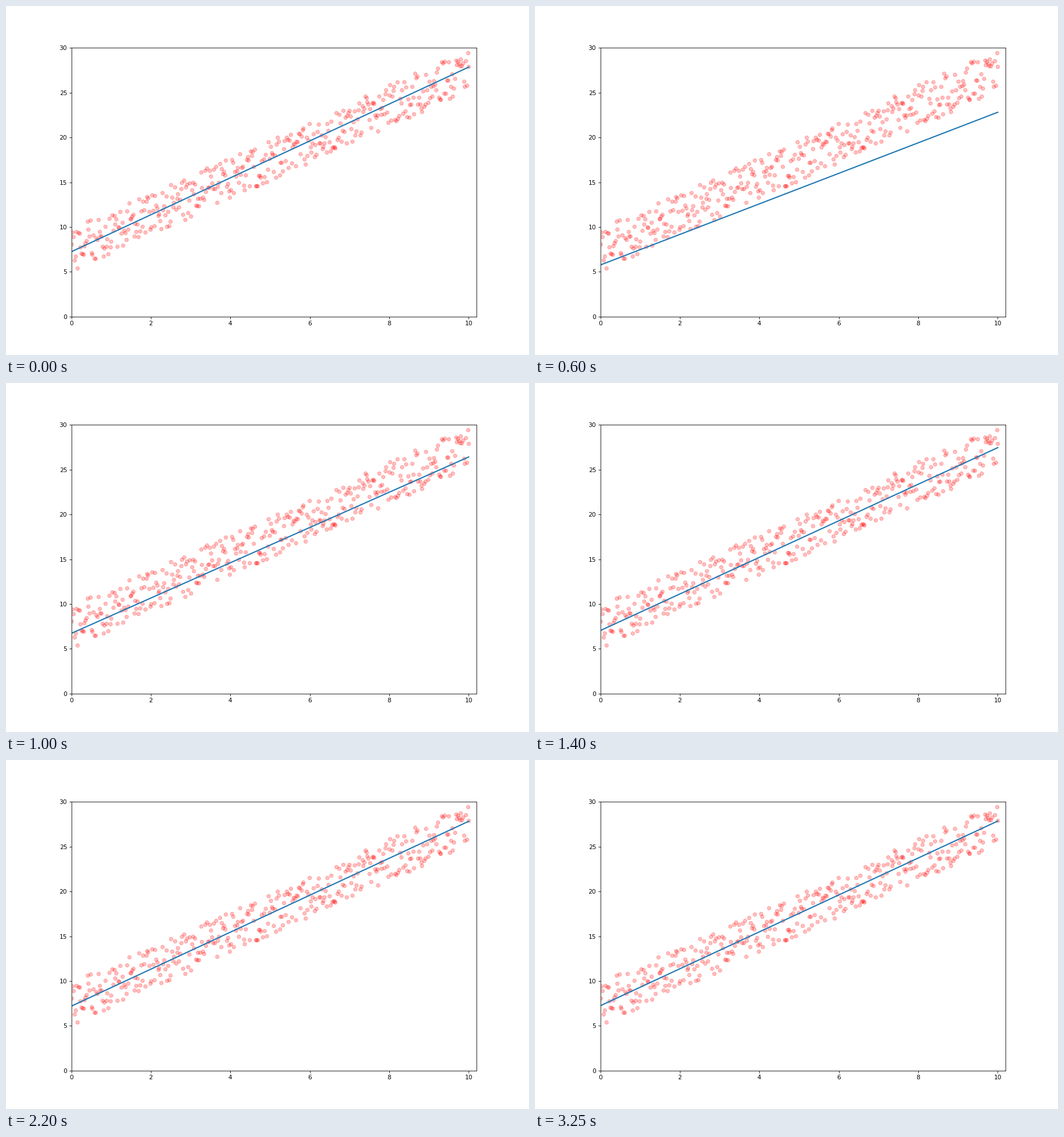
Animation of 917x611 px, one loop 3300 ms. Source, as a matplotlib script:

```python
import numpy as np
import matplotlib.pyplot as plt
from matplotlib.animation import FuncAnimation

WIDTH, HEIGHT = 917, 611
DPI = WIDTH / 12
FRAMES, INTERVAL = 66, 50
POINTS = 400


def make_cloud():
    """Points scattered evenly in a band around y = 2x + 7.5."""
    rng = np.random.default_rng(7)
    x = np.linspace(0, 10, POINTS)
    y = 2 * x + rng.uniform(5.1, 9.85, POINTS)
    return x, y


def fit_at(step):
    """Intercept and slope after some steps of gradient descent from zero."""
    fast, slow = 0.857 ** step, 0.958 ** step
    intercept = 7.27 * (1 - 0.946 * fast - 0.054 * slow)
    slope = 2.058 * (1 - 1.026 * fast + 0.026 * slow)
    return intercept, slope


# The small margin keeps the pixel size from being rounded down.
size = (WIDTH + 0.01) / DPI, (HEIGHT + 0.01) / DPI
fig, ax = plt.subplots(figsize=size, dpi=DPI)
fig.subplots_adjust(left=0.125, right=0.9, bottom=0.11, top=0.88)
ax.set_xlim(0, 10.2)
ax.set_ylim(0, 30)

ax.scatter(*make_cloud(), s=36, color="red", alpha=0.25)
line, = ax.plot([], [], color="tab:blue", lw=2)
ends = np.array([0, 10])


def update(frame):
    # The loop opens on the finished fit, then restarts from a flat line.
    intercept, slope = fit_at((frame - 1) % FRAMES)
    line.set_data(ends, intercept + slope * ends)
    return line,


anim = FuncAnimation(fig, update, frames=FRAMES, interval=INTERVAL,
                     repeat=True, repeat_delay=0)
plt.show()
```
